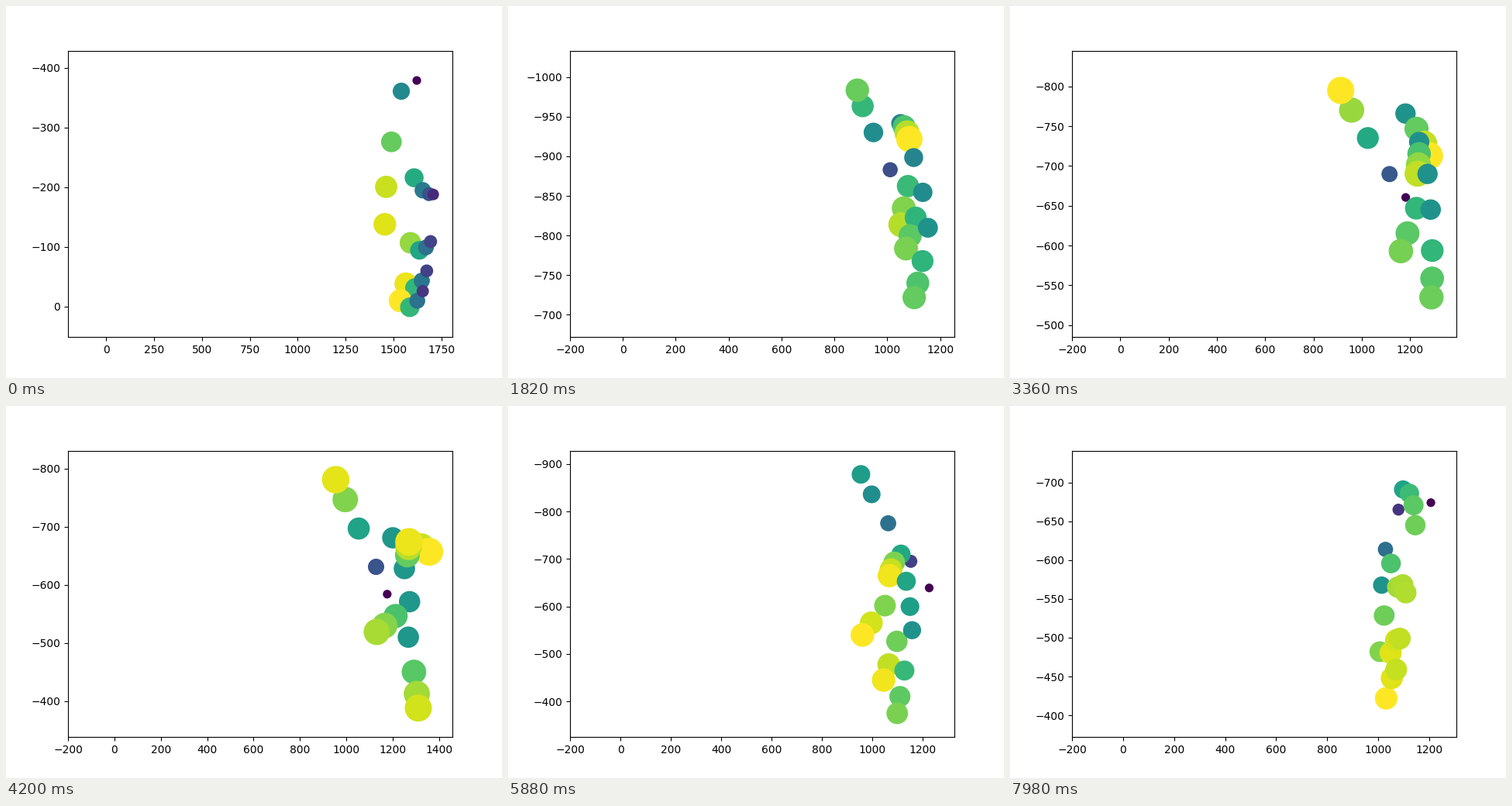
Write a matplotlib script that moves like this. It is 640x480 px and loops after 8000 ms.

```python
import numpy as np
import matplotlib.pyplot as plt
from matplotlib.animation import FuncAnimation

LOOP, STEP, FRAMES = 8000, 70, 115
LEFT, PAD_X, PAD_Y = -200, 100, 50
BASE = 50                            # marker area of the wrist
THUMB = ((0, 0.36, 0.70, 1), 1.1)    # joint spacing, bow
FINGER = ((0, 0.46, 0.78, 1), 0.2)


def pose(wrist, thumb, knuckles, tips):
    """Key points as x, y, depth; the ring knuckle follows from the others."""
    return np.array([wrist, *thumb, *knuckles, *tips], float)


reach = pose(
    (1622, -379, 0),
    [(1541, -361, 174), (1455, -138, 352)],
    [(1608, -216, 226), (1589, -107, 311), (1536, -10, 370)],
    [(1708, -188, 44), (1694, -109, 74), (1674, -60, 70), (1653, -26, 59)])

fold = pose(
    (982, -875, 0),
    [(939, -940, 105), (927, -1118, 285)],
    [(981, -970, 210), (1008, -916, 225), (1015, -816, 275)],
    [(1040, -992, 500), (979, -907, 475), (964, -844, 450), (990, -732, 460)])

thumb_out = pose(
    (1188, -774, 0),
    [(1095, -791, 140), (872, -831, 500)],
    [(1139, -885, 230), (1207, -859, 230), (1293, -793, 245)],
    [(1162, -814, 500), (1155, -708, 415), (1178, -686, 350), (1238, -695, 300)])

spread = pose(
    (1176, -584, 0),
    [(1128, -631, 150), (954, -781, 552)],
    [(1200, -681, 305), (1250, -628, 305), (1267, -510, 305)],
    [(1357, -657, 575), (1270, -674, 558), (1131, -519, 500), (1310, -388, 535)])

open_hand = pose(
    (1226, -639, 0),
    [(1153, -695, 74), (955, -878, 215)],
    [(1114, -710, 234), (1135, -653, 230), (1158, -550, 199)],
    [(1068, -665, 382), (961, -540, 390), (1045, -445, 382), (1099, -375, 312)])

curl = pose(
    (612, -697, 0),
    [(662, -758, 78), (791, -783, 347)],
    [(700, -796, 297), (666, -750, 319), (636, -654, 353)],
    [(845, -699, 560), (903, -614, 549), (869, -603, 465), (782, -607, 431)])

point_down = pose(
    (1206, -674, 0),
    [(1079, -665, 52), (1027, -529, 217)],
    [(1097, -691, 203), (1122, -686, 238), (1145, -645, 273)],
    [(1006, -482, 284), (1031, -422, 350), (1053, -448, 333), (1070, -459, 319)])

TIMES = np.array([0, 1120, 2520, 4200, 5880, 6930, 7980])
POSES = np.stack([reach, fold, thumb_out, spread, open_hand, curl, point_down])

# Smooth path through the poses that never overshoots them
SPANS = np.diff(TIMES)
RATE = np.diff(POSES, axis=0) / SPANS[:, None, None]
a, b = RATE[:-1], RATE[1:]
total = np.where(a * b > 0, a + b, 1)
SLOPES = np.concatenate(
    [RATE[:1], np.where(a * b > 0, 2 * a * b / total, 0), RATE[-1:]])


def keys_at(t):
    k = min(np.searchsorted(TIMES, t, side="right") - 1, len(SPANS) - 1)
    h = SPANS[k]
    u = (t - TIMES[k]) / h
    ease = u * u * (3 - 2 * u)
    return (POSES[k] * (1 - ease) + POSES[k + 1] * ease
            + h * u * (1 - u) * ((1 - u) * SLOPES[k] - u * SLOPES[k + 1]))


def digit(wrist, base, tip, spacing, bow):
    """Four joints from base to tip, bowed away from the wrist."""
    u = np.array(spacing)[:, None]
    return base + (tip - base) * u + bow * u * (1 - u) * (base - wrist)


def hand_at(t):
    wrist, thumb, thumb_tip, index, middle, pinky, *tips = keys_at(t)
    ring = middle + (pinky - index) / 3
    joints = [wrist[None], digit(wrist, thumb, thumb_tip, *THUMB)]
    for knuckle, tip in zip((index, middle, ring, pinky), tips):
        joints.append(digit(wrist, knuckle, tip, *FINGER))
    return np.concatenate(joints).T


fig, ax = plt.subplots(figsize=(6.4, 4.8), dpi=100)
x0, y0, z0 = hand_at(0)
dots = ax.scatter(x0, y0, s=BASE + z0, c=z0, cmap="viridis")


def update(i):
    x, y, z = hand_at(i * STEP)
    dots.set_offsets(np.column_stack([x, y]))
    dots.set_sizes(BASE + z)
    dots.set_array(z)
    dots.set_clim(z.min(), z.max())
    ax.set_xlim(LEFT, x.max() + PAD_X)
    ax.set_ylim(y.max() + PAD_Y, y.min() - PAD_Y)
    return dots,


anim = FuncAnimation(fig, update, frames=FRAMES, interval=LOOP / FRAMES,
                     init_func=lambda: update(0), repeat=True, repeat_delay=0)
plt.show()
```
